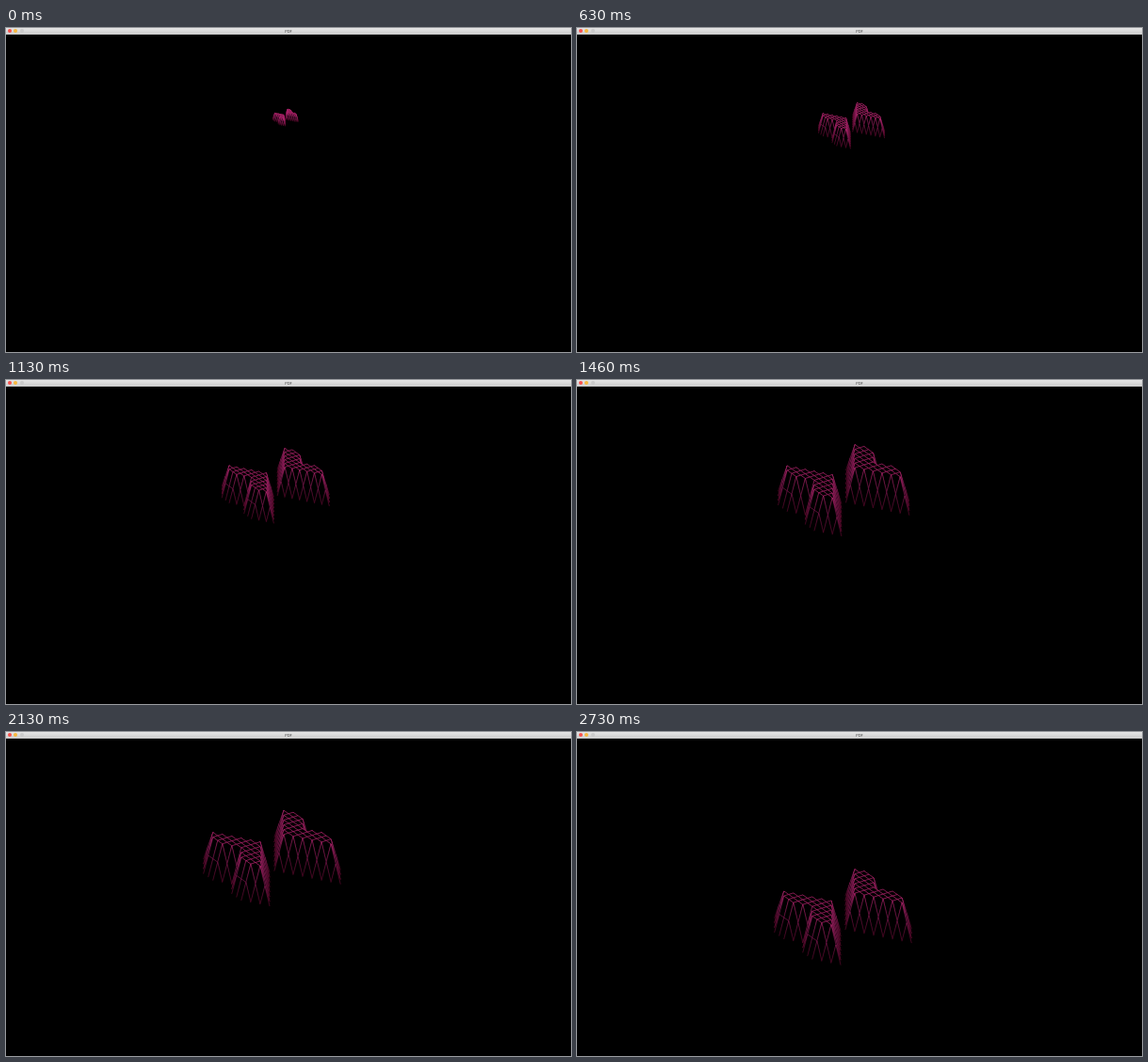
An HTML page with a canvas that plays this animation: 600x344 px, repeating every 3000 ms.

```html
<!DOCTYPE html>
<html lang="en">
<head>
<meta charset="utf-8">
<title>Wireframe</title>
<style>
  html, body { margin: 0; width: 100%; height: 100%; overflow: hidden; background: #000; }
  #stage { position: relative; width: 600px; height: 344px; overflow: hidden; }
  canvas { position: absolute; left: 0; top: 0; }
  #bar { position: absolute; left: 0; top: 0; width: 600px; height: 7px;
    background: linear-gradient(#e6e6e6, #cbcbcb); }
  #bar span { position: absolute; left: 0; width: 600px; top: .5px; text-align: center;
    font: 4px/6px "Open Sans", "Liberation Sans", sans-serif; color: #333; }
  #bar i { position: absolute; top: 1.2px; width: 4px; height: 4px; border-radius: 50%; }
</style>
</head>
<body>
<div id="stage">
  <canvas id="view" width="600" height="344"></canvas>
  <div id="bar">
    <i style="left:2px;background:#f9504c"></i>
    <i style="left:8.4px;background:#f8b83c"></i>
    <i style="left:14.7px;background:#cacaca"></i>
    <span>PDF</span>
  </div>
</div>
<script>
const ctx = document.getElementById('view').getContext('2d');
const LOOP = 3000;
const LEVEL = 17.8;                    // screen height of one level
const ROW = 2.55;                      // screen depth of one lattice row
const COLORS = ['#64082f', '#8c1a57', '#cc2a7e'];

// Plateaus on the diamond lattice: a0, a1, b0, b1
const PLATEAUS = [
  [0, 10, 0, 4], [6, 10, 0, 10],
  [15, 19, -15, -5], [15, 25, -9, -5]
];

// Plateau points; the map's side borders cut off some corners
const tops = [];
for (const [a0, a1, b0, b1] of PLATEAUS) {
  for (let a = a0; a <= a1; a++) {
    for (let b = b0; b <= b1; b++) {
      if ((a + b) % 2 === 0 && b - a <= 2 && b - a >= -32) tops.push([a, b]);
    }
  }
}

function levelAt(a, b) {
  const dist = tops.map(([ta, tb]) => Math.max(Math.abs(a - ta), Math.abs(b - tb)));
  return Math.max(0, 2 - Math.min(...dist));
}

// Position relative to the zoom centre
function vertex(a, b) {
  const level = levelAt(a, b);
  return { x: 5 * a - 80, y: a + ROW * b + 1 + (2 - level) * LEVEL, level };
}

// Cells from back to front
const cells = [];
for (let b = -19; b <= 14; b++) {
  for (let a = -4; a <= 29; a++) {
    if ((a + b) % 2 === 0) continue;
    const quad = [vertex(a, b - 1), vertex(a + 1, b), vertex(a, b + 1), vertex(a - 1, b)];
    if (quad.some(p => p.level)) cells.push(quad);
  }
}

function edge(p, q) {
  if (!p.level && !q.level) return;
  let ink = COLORS[p.level];
  if (p.level !== q.level) {
    ink = ctx.createLinearGradient(p.x, p.y, q.x, q.y);
    ink.addColorStop(0, COLORS[p.level]);
    ink.addColorStop(1, COLORS[q.level]);
  }
  ctx.strokeStyle = ink;
  ctx.beginPath();
  ctx.moveTo(p.x, p.y);
  ctx.lineTo(q.x, q.y);
  ctx.stroke();
}

function draw(scale, shift) {
  ctx.fillStyle = '#000';
  ctx.fillRect(0, 0, 600, 344);
  ctx.lineWidth = 0.46;
  for (const cell of cells) {
    const quad = cell.map(p => ({ x: 300 + p.x * scale, y: 90 + shift + p.y * scale, level: p.level }));
    ctx.beginPath();
    quad.forEach(p => ctx.lineTo(p.x, p.y));
    ctx.fill();
    quad.forEach((p, i) => edge(p, quad[(i + 1) % 4]));
  }
}

// Key repeats: zoom in 19 times, then one press down and a held key
function zoomSteps(t) {
  return t < 60 ? 0 : Math.min(19, 1 + Math.floor((t - 60) / 82.2));
}
function downSteps(t) {
  if (t < 1960) return 0;
  return t < 2460 ? 1 : Math.min(5, 2 + Math.floor((t - 2460) / 90));
}

let last = '';
function tick() {
  const t = performance.now() % LOOP;
  const zoom = zoomSteps(t), down = downSteps(t);
  const key = zoom + ',' + down;
  if (key !== last) {
    last = key;
    draw(0.18 + 0.0433 * zoom, 15.6 * down);
  }
  requestAnimationFrame(tick);
}
tick();
</script>
</body>
</html>
```
